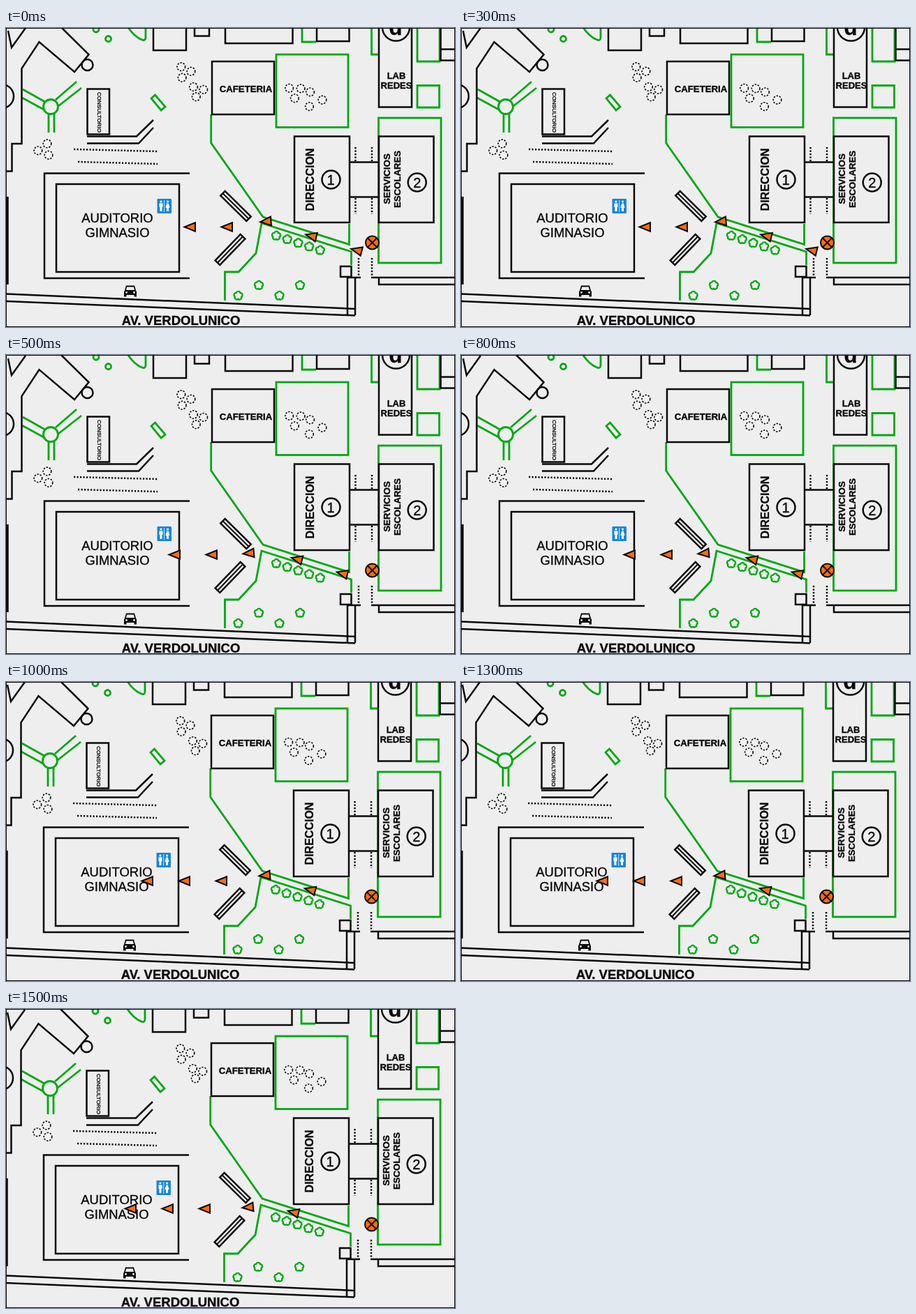
Animation, 643 px wide and 429 px high, one loop 2 s. Source, as an HTML page:

```html
<!DOCTYPE html>
<html lang="es">
<head>
<meta charset="utf-8">
<title>Plano del campus</title>
<style>
  html, body { margin: 0; width: 100%; height: 100%; overflow: hidden; background: #eee; }
  svg { display: block; width: 643px; height: 429px; }
  .ink, .green { fill: none; stroke: #0a0a0a; stroke-width: 2.5; }
  .green { stroke: #00a811; stroke-width: 2.8; }
  .dots { stroke-dasharray: 2.2 2.3; }
  .ring { fill: #f1f1f1; stroke-width: 1.6; stroke-dasharray: 2.4 1.8; }
  text {
    font-family: "Liberation Sans", Arial, sans-serif; text-anchor: middle;
    fill: #0a0a0a; stroke: #0a0a0a; stroke-width: .35;
  }
  .bold { font-weight: bold; }
  .arrow { fill: #ff6c0a; stroke: #0a0a0a; stroke-width: 2; }
  #map { animation: jitter 2s step-end infinite; }
  .pose { visibility: hidden; animation: pose 2s step-end infinite; }
  @keyframes jitter {
    0% { transform: translate(0, 0); }
    25% { transform: translate(0, 1px); }
    50% { transform: translate(-1px, 0); }
    75% { transform: translate(-1px, 1px); }
  }
  @keyframes pose {
    0% { visibility: visible; }
    25%, 100% { visibility: hidden; }
  }
</style>
</head>
<body>
<svg viewBox="0 0 643 429">
  <defs>
    <path id="arrow" d="M-7.5 0L8 -6.3V6.3Z"/>
    <path id="bush" stroke-width="2.3"/>
    <g id="bench">
      <rect x="-26" y="-4.6" width="52" height="9.2"/>
      <path d="M-26 0H26" stroke-width="2"/>
    </g>
  </defs>

  <g id="map">
    <g class="green">
      <circle cx="129" cy="2" r="4"/>
      <circle cx="146.5" cy="15.5" r="4"/>
      <path d="M174 -2Q184 13 195 17Q200 19 200 13V-2"/>
      <path d="M424 -2V20H444M523.5 -2V38H533"/>
      <path d="M589 -2V48H621V-2M589 82.500H620.500V114H589Z"/>
      <rect x="387" y="38" width="103" height="104.5"/>
      <rect x="533.5" y="129" width="89.5" height="208"/>
      <path d="M208 101L213.500 96L228 113L222 118Z"/>
      <circle cx="64" cy="113" r="10.5"/>
      <path d="M24 88L56 106M23 100L54 117M101 77L71 103M108 86L75 112M61 123V150M69 123V150"/>
      <path d="M293.700 124V165L368 271L491.500 310.500V281"/>
      <path d="M494.500 340V321L366 280L358 323L333 350H313.500V391"/>
      <g id="bushes"></g>
    </g>

    <g class="ink">
      <path d="M2 242V368" stroke-width="3.5"/>
      <path d="M28 0L8 28L3 4M78 -2L118.500 38L98 63L47.500 20L22.500 58V166H8.500V205.500H0"/>
      <circle cx="116.5" cy="53" r="8"/>
      <circle cx="-6" cy="98" r="17"/>
      <path d="M211 -2V32H258V-2M270 -2V11.500H291V-2M314 -2V22H410.500V-2M445 -2V19H491.500V-2"/>
      <path d="M534 -2V113.500H581V-2M622.500 -2V46.500H645M622.500 30.500H645"/>
      <circle cx="558.5" cy="-1" r="19.5"/>
      <rect x="295" y="48" width="89" height="76"/>
      <rect x="116.5" y="87.5" width="31.5" height="65"/>
      <path d="M116 155.500H187L211 132M116 165.500H190L211 143"/>
      <path d="M263 208.500H55V359H263"/>
      <rect x="72" y="224" width="176" height="126"/>
      <rect x="413" y="155.5" width="79" height="123.5"/>
      <rect x="534" y="155.5" width="78.5" height="123.5"/>
      <path d="M492 192.500H534M492 242.500H534"/>
      <circle cx="465.5" cy="217.5" r="13"/>
      <circle cx="588.7" cy="221.5" r="13"/>
      <path class="dots" d="M97 174L217 177M103 192L217 195"/>
      <path class="dots" d="M500.500 171V192M524 171V192M500.500 244V267M524 244V267M505 330V357M524 330V357"/>
      <rect x="479" y="342" width="15.5" height="15"/>
      <path d="M489 357V412M500 357V412M489 358H508M523 358H645M534 358V368H645"/>
      <path d="M0 381.500L500 403M0 392L500 412.500"/>
      <use href="#bench" transform="translate(329 255.5) rotate(44.5)"/>
      <use href="#bench" transform="translate(321 318) rotate(-46)"/>
      <g id="rings" class="ring"></g>
    </g>

    <g class="bold">
      <text x="558" y="10" font-size="31">d</text>
      <text x="559" y="73" font-size="13">LAB</text>
      <text x="559" y="87" font-size="13">REDES</text>
      <text x="343.5" y="92" font-size="13.2">CAFETERIA</text>
      <text transform="translate(441 217.5) rotate(-90)" font-size="16">DIRECCION</text>
      <text transform="translate(550 216.5) rotate(-90)" font-size="13.4">SERVICIOS</text>
      <text transform="translate(565 217) rotate(-90)" font-size="13.2">ESCOLARES</text>
      <text x="250.5" y="426" font-size="18.5">AV. VERDOLUNICO</text>
    </g>
    <text transform="translate(131 121) rotate(90)" font-size="8">CONSULTORIO</text>
    <text x="159.5" y="279" font-size="18.5">AUDITORIO</text>
    <text x="159.5" y="300" font-size="18.4">GIMNASIO</text>
    <text x="465" y="225" font-size="20">1</text>
    <text x="588.7" y="229" font-size="20">2</text>

    <!-- Restrooms -->
    <g transform="translate(216.5 245)" fill="#fff">
      <rect width="20.5" height="21" rx="1" fill="#1686d9"/>
      <circle cx="5.5" cy="4" r="1.6"/>
      <path d="M3 6.500H8V12H7V18H4V12H3Z"/>
      <path d="M9.900 2H10.700V19H9.900Z"/>
      <circle cx="15" cy="4" r="1.6"/>
      <path d="M13.800 6.500H16.200L18 13H16.500V18H13.500V13H12Z"/>
    </g>

    <!-- Car -->
    <g transform="translate(178 377.5)" fill="#0a0a0a">
      <path d="M-6 -8H6L8 -1L9 1V8H5.500V5.500H-5.500V8H-9V1L-8 -1Z"/>
      <path d="M-4.800 -6H4.800L6 -1.500H-6Z" fill="#eee"/>
      <circle cx="-5.500" cy="2" r="1.4" fill="#eee"/>
      <circle cx="5.5" cy="2" r="1.4" fill="#eee"/>
    </g>

    <g class="arrow">
      <circle cx="524.5" cy="308" r="9.5"/>
      <path d="M518 301.500L531 314.500M531 301.500L518 314.500"/>
    </g>
    <g id="arrows" class="arrow"></g>
  </g>
  <rect class="ink" x=".5" y=".5" width="642" height="428" style="stroke-width:1"/>
</svg>
<script>
  const NS = 'http://www.w3.org/2000/svg';
  const byId = id => document.getElementById(id);

  function add(parent, tag, attrs) {
    const el = document.createElementNS(NS, tag);
    for (const key in attrs) el.setAttribute(key, attrs[key]);
    return parent.appendChild(el);
  }

  function polar(r, degrees) {
    const a = degrees * Math.PI / 180;
    return [r * Math.cos(a), r * Math.sin(a)];
  }

  // Bushes: five round lobes, a row along the path and a zigzag below
  let lobes = 'M' + polar(5, 20);
  for (let i = 1; i <= 5; i++) lobes += 'A3.1 3.1 0 0 1 ' + polar(5, 20 + 72 * i);
  byId('bush').setAttribute('d', lobes + 'Z');

  const bush = (x, y) => add(byId('bushes'), 'use', { href: '#bush', x, y });
  for (let i = 0; i < 5; i++) bush(387 + 15.7 * i, 298 + 5.2 * i);
  for (let i = 0; i < 4; i++) bush(332.5 + 29.5 * i, i % 2 ? 369 : 384);

  // Trees stand in trios around a centre
  function trio(x, y, radius, angle) {
    for (let i = 0; i < 3; i++) {
      const [dx, dy] = polar(radius, angle + 120 * i);
      add(byId('rings'), 'circle', { cx: x + dx, cy: y + dy, r: 5.8 });
    }
  }
  trio(256, 63, 9, -5);
  trio(274.5, 90.5, 8.5, -15);
  trio(413.7, 91.3, 9.5, -28);
  trio(441, 102.5, 12, 3);
  trio(55.3, 174.7, 9.5, 173);

  // The route climbs to a bend, drops a little and then runs level
  const BEND = 371, FLAT_GAP = 53, SLOPE_GAP = 65, COUNT = 5;
  const routeY = x => x > BEND
    ? 277.5 + (x - BEND) * 0.316
    : Math.min(285.5, 277.5 + (BEND - x) * 0.25);
  const tilt = x => x > BEND + 5 ? 14 : x > BEND - 30 ? -5 : 0;

  function pose(delay, flatStart, slopeStart) {
    const xs = [];
    for (let x = flatStart; x < slopeStart - 40; x += FLAT_GAP) xs.push(x);
    for (let x = slopeStart; xs.length < COUNT; x += SLOPE_GAP) xs.push(x);
    const g = add(byId('arrows'), 'g', { class: 'pose', style: `animation-delay:${delay}ms` });
    for (const x of xs)
      add(g, 'use', { href: '#arrow', transform: `translate(${x} ${routeY(x)}) rotate(${tilt(x)})` });
  }
  pose(0, 263, 371.5);
  pose(-1500, 241, 416);
  pose(-1000, 203, 371);
  pose(-500, 179, 347);
</script>
</body>
</html>
```
